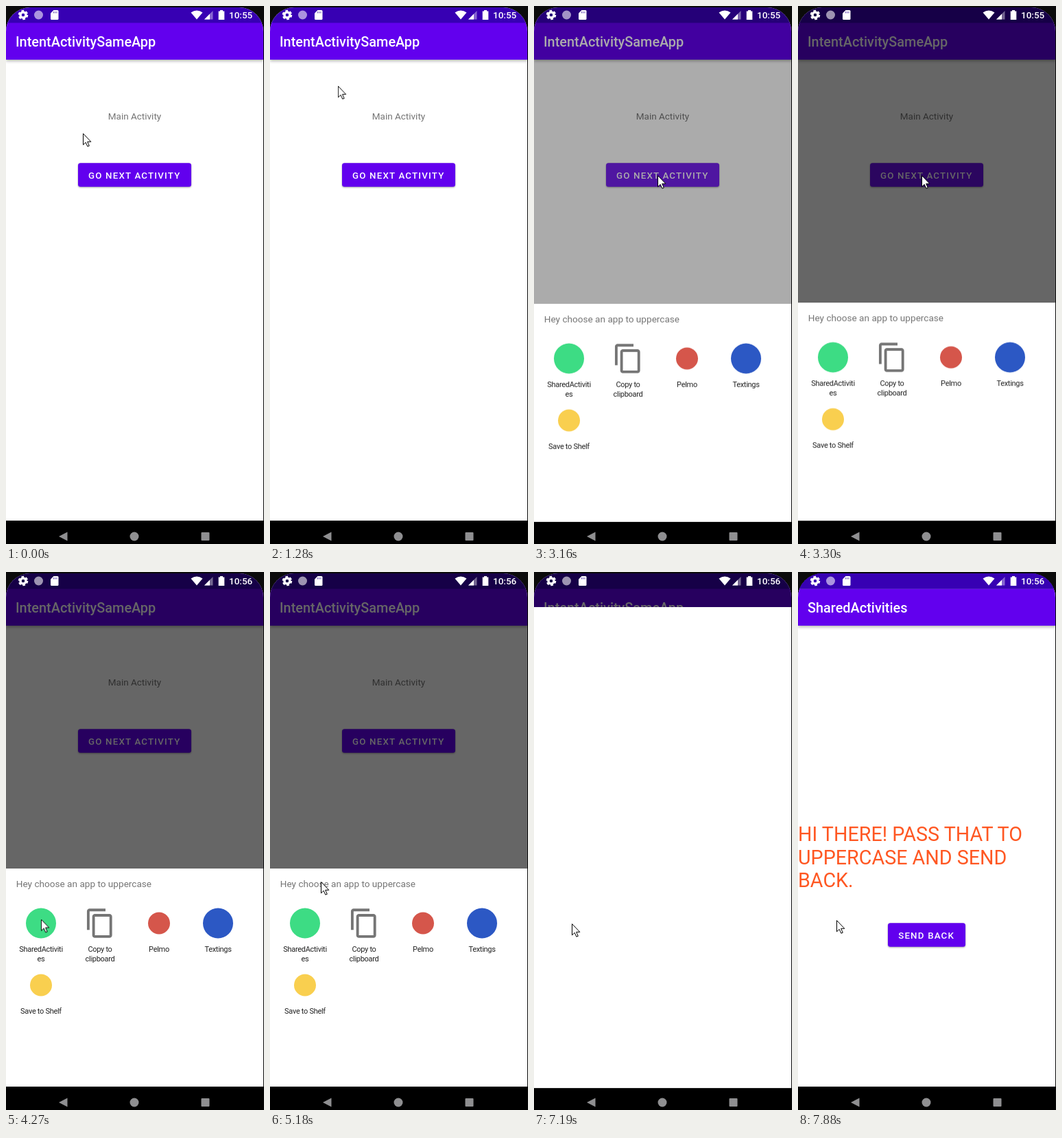
Recreate the animation shown at these times as an HTML page. Size 376 by 782 pixels, loop 8 s.

```html
<!DOCTYPE html>
<html lang="en">
<head>
<meta charset="utf-8">
<title>Activity chooser</title>
<style>
  html, body { margin: 0; width: 100%; height: 100%; overflow: hidden; background: #0b0b0b; }
  #stage { position: relative; width: 376px; height: 782px; overflow: hidden; }
  #screen { position: absolute; inset: 0; clip-path: inset(2px 1px 0 0 round 35px 35px 0 0); }
  svg { position: absolute; left: 0; top: 0; width: 376px; height: 782px; }
  text { font: 400 13.5px Roboto, sans-serif; }
  .title { font-size: 19.9px; font-weight: 500; fill: #fff; }
  .caps { font-size: 13.3px; font-weight: 500; letter-spacing: 1.19px; fill: #fff; }
  .grey { fill: #757575; }
  .prompt { font-size: 13.6px; }
  .label { font-size: 11px; letter-spacing: -.3px; fill: #222; text-anchor: middle; }
  .big { font-size: 28.7px; fill: #ff5722; }
  .clock { font-weight: 500; fill: #fff; }
  .bar { fill: #6200ee; filter: drop-shadow(0 2px 2px rgba(0, 0, 0, .3)); }
  .button { fill: #6200ee; filter: drop-shadow(0 1px 1px rgba(0, 0, 0, .35)); }
  #touch { transform-box: fill-box; transform-origin: center; }
</style>
</head>
<body>
<div id="stage">
  <div id="screen">
    <svg>
      <rect width="376" height="782" fill="#fff"/>
      <rect class="bar" y="24" width="376" height="54"/>
      <rect width="376" height="24.5" fill="#3700b3"/>
      <text class="title" x="14" y="59">IntentActivitySameApp</text>
      <text class="grey" x="187.5" y="165" text-anchor="middle">Main Activity</text>
      <rect id="next" class="button" x="105" y="228.3" width="165" height="34.5" rx="3.5"/>
      <rect id="ripple" x="105" y="228.3" width="165" height="34.5" rx="3.5" fill="#fff" opacity="0"/>
      <text class="caps" x="120" y="251">GO NEXT ACTIVITY</text>
      <rect y="748" width="376" height="34"/>
      <rect id="dim" width="376" height="782" opacity="0"/>
    </svg>

    <svg id="sheet">
      <rect y="431" width="376" height="317" fill="#fff"/>
      <rect y="748" width="376" height="60"/>
      <text class="grey prompt" x="14.8" y="457.5">Hey choose an app to uppercase</text>
      <circle id="touch" cx="52" cy="517" r="31" fill="#efefef" opacity="0"/>
      <path transform="translate(114.1 487.4) scale(1.93)" fill="#757575" d="M16 1H4c-1.100 0-2 .9-2 2v14h2V3h12V1zm3 4H8c-1.100 0-2 .9-2 2v14c0 1.100.9 2 2 2h11c1.100 0 2-.9 2-2V7c0-1.100-.9-2-2-2zm0 16H8V7h11v14z"/>
      <g id="apps"></g>
    </svg>

    <svg id="splash">
      <rect width="376" height="782" fill="#fff"/>
      <rect width="376" height="24.5" fill="#3700b3"/>
      <rect y="748" width="376" height="60"/>
    </svg>

    <svg id="shared">
      <rect class="bar" y="24.5" width="376" height="53.5"/>
      <rect width="376" height="24.5" fill="#3700b3"/>
      <text class="title" x="14" y="59">SharedActivities</text>
      <text class="big" x="0" y="391">HI THERE! PASS THAT TO</text>
      <text class="big" x="0" y="424.5">UPPERCASE AND SEND</text>
      <text class="big" x="0" y="458">BACK.</text>
      <rect class="button" x="131" y="510.3" width="113" height="34.5" rx="3.5"/>
      <text class="caps" x="146.2" y="533">SEND BACK</text>
    </svg>

    <svg>
      <g fill="none" stroke="#fff">
        <circle cx="25" cy="13" r="4" stroke-width="3.4"/>
        <circle cx="25" cy="13" r="6" stroke-width="2.6" stroke-dasharray="3.5 2.783"/>
      </g>
      <circle cx="47.5" cy="13" r="6.5" fill="#fff" opacity=".58"/>
      <g fill="#fff">
        <path d="M69.5 6H75q1.5 0 1.5 1.5V18.5q0 1.5-1.5 1.5H66.500q-1.5 0-1.5-1.5V10.500Z"/>
        <path d="M278 19.500L269.500 9.500Q278 3.500 286.500 9.500Z"/>
        <path opacity=".4" d="M289 19.500L301.500 7V19.500Z"/>
        <path d="M289 19.500L297 11.500V19.500Z"/>
        <path d="M312 6h4v1.500h2.300V20h-8.600V7.500H312Z"/>
      </g>
      <path stroke="#6a50b5" d="M69.500 8v2.500M71.700 8v2.500M73.900 8v2.500"/>
      <text id="before" class="clock" x="325" y="18.3">10:55</text>
      <text id="after" class="clock" x="325" y="18.3">10:56</text>
      <g fill="#8f8f91">
        <path d="M77 771L89.500 764.500V777.500Z"/>
        <circle cx="187" cy="771" r="6.5"/>
        <rect x="284.5" y="765" width="12" height="12" rx="1"/>
      </g>
    </svg>
  </div>

  <svg id="cursor">
    <path fill="#fff" stroke="#000" d="M.5 .5V16.800L4.200 13.300 6.900 19.200 9.300 18.200 6.700 12.300H11.800Z"/>
  </svg>
</div>

<script>
const LOOP = 8000;
const $ = id => document.getElementById(id);

// Each step: [ms, properties, easing to the next step]
function play(id, steps) {
  const all = [[0, steps[0][1]], ...steps, [LOOP, steps.at(-1)[1]]];
  const frames = all.map(([ms, props, easing = 'linear']) => ({ offset: ms / LOOP, easing, ...props }));
  $(id).animate(frames, { duration: LOOP, iterations: Infinity });
}

const fade = (id, start, end, from, to) =>
  play(id, [[start, { opacity: from }], [end, { opacity: to }]]);

// A window opens: revealed upwards while it rises into place
function openWindow(id, start) {
  const pose = (left, opacity = 1) => ({
    opacity,
    transform: `translateY(${32 * left}px)`,
    clipPath: `inset(${95.9 * left}% 0 0 0)`
  });
  play(id, [
    [start, pose(1, 0)],
    [start, pose(1), 'cubic-bezier(.3,0,.8,.15)'],
    [start + 71, pose(.6), 'cubic-bezier(.05,.7,.1,1)'],
    [start + 425, pose(0)]
  ]);
}

// Chooser grid, four columns wide
const apps = [
  { lines: ['SharedActiviti', 'es'], color: '#3ddc84', r: 22 },
  { lines: ['Copy to', 'clipboard'] },
  { lines: ['Pelmo'], color: '#d5564b', r: 16 },
  { lines: ['Textings'], color: '#2c58c4', r: 22 },
  { lines: ['Save to Shelf'], color: '#f9cf4f', r: 16 }
];
$('apps').innerHTML = apps.map(({ lines, color, r }, i) => {
  const x = 51 + 86 * (i % 4), y = 510.5 + 90 * Math.floor(i / 4);
  const icon = color ? `<circle cx="${x}" cy="${y}" r="${r}" fill="${color}"/>` : '';
  return icon + lines.map((line, n) =>
    `<text class="label" x="${x}" y="${y + 41.5 + 14 * n}">${line}</text>`).join('');
}).join('');

// Pointer moves along quadratic curves: start, end, target, control point
const moves = [
  [30, 870, [203, 44], [-89, 20]],
  [900, 1690, [174, 233], [7, 100]],
  [1690, 1820, [180, 248]],
  [2480, 2500, [180, 246]],
  [3520, 4340, [60, 526], [-5, 400]],
  [4370, 4800, [120, 706], [443, 520]],
  [4800, 5180, [74, 450], [-74, 600]],
  [5200, 6020, [2, 521], [412, 450]],
  [6090, 6430, [55, 511]],
  [7560, 7880, [56, 506]]
];
const SAMPLES = 12;
let from = [112, 185];
play('cursor', moves.flatMap(([start, end, to, control]) => {
  const a = from, c = control || a.map((v, k) => (v + to[k]) / 2);
  from = to;
  return Array.from({ length: SAMPLES + 1 }, (_, i) => {
    const t = i / SAMPLES, u = 1 - t;
    const [x, y] = a.map((v, k) => u * u * v + 2 * u * t * c[k] + t * t * to[k]);
    return [start + t * (end - start), { transform: `translate(${x}px, ${y}px)` }];
  });
}));

// Button press
const shadow = (y, blur, alpha) => ({ filter: `drop-shadow(0 ${y}px ${blur}px rgba(0,0,0,${alpha}))` });
const rest = shadow(1, 1, .35), raised = shadow(3, 2.5, .45);
play('next', [[2660, rest], [2750, raised], [2860, raised], [3000, rest]]);
play('ripple', [[2740, { opacity: 0 }], [2900, { opacity: .18 }], [3060, { opacity: .18 }], [3420, { opacity: 0 }]]);

// Chooser
fade('dim', 2994, 3300, 0, .6);
openWindow('sheet', 2960);
fade('before', 4000, 4000, 1, 0);
fade('after', 4000, 4000, 0, 1);
play('touch', [
  [6680, { opacity: 0, transform: 'scale(.4)' }],
  [6920, { opacity: 1, transform: 'scale(1)' }]
]);

// Second activity
openWindow('splash', 7000);
fade('shared', 7560, 7740, 0, 1);
</script>
</body>
</html>
```
